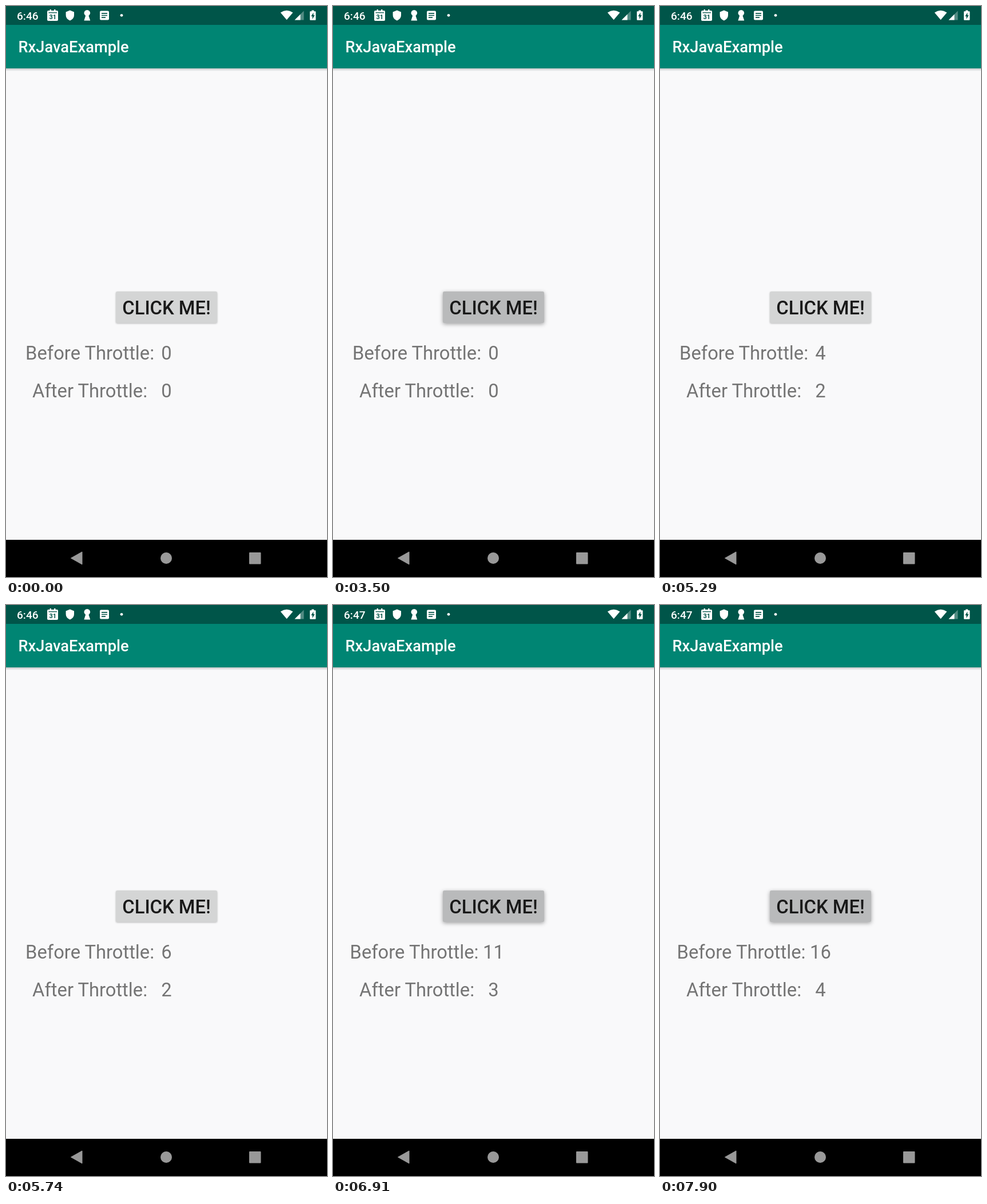
An HTML page that plays this animation: 561 px wide and 998 px high, repeating every 7990 ms.

```html
<!DOCTYPE html>
<html lang="en">
<head>
<meta charset="utf-8">
<title>RxJavaExample</title>
<style>
  html, body { margin: 0; width: 100%; height: 100%; overflow: hidden; background: #f9f9fa; }
  svg { display: block; width: 100vw; height: 100vh; font-family: Roboto, sans-serif; }
  .medium { font-weight: 500; }
  .label { font-size: 32.73px; fill: #747474; text-anchor: middle; }
  #btn { fill: #d4d5d5; filter: drop-shadow(0 1.5px 1.5px rgba(0, 0, 0, .26)); }
  #btn.down { fill: #b9babb; filter: drop-shadow(0 2.5px 3.5px rgba(0, 0, 0, .36)); }
</style>
</head>
<body>
<svg viewBox="0 0 561 998" preserveAspectRatio="none">
  <defs>
    <linearGradient id="shade" x2="0" y2="1">
      <stop stop-color="#000" stop-opacity=".2"/>
      <stop offset="1" stop-color="#000" stop-opacity="0"/>
    </linearGradient>
  </defs>

  <rect width="561" height="998" fill="#f9f9fa"/>
  <rect y="109" width="561" height="5" fill="url(#shade)"/>
  <rect width="561" height="109" fill="#008573"/>
  <rect width="561" height="33" fill="#005549"/>

  <g fill="#fff">
    <text id="clock" class="medium" x="19" y="23.8" font-size="19.1">6:46</text>

    <!-- notification icons -->
    <path d="M74 8h2.500v-2h2.500v2h5v-2h2.500v2h2.500q2 0 2 2v14q0 2-2 2h-15q-2 0-2-2v-14q0-2 2-2z"/>
    <path d="M74.500 11.700h14.500" stroke="#005549" stroke-width="1.300"/>
    <text x="81.700" y="22.700" font-size="11" font-weight="700" text-anchor="middle" fill="#005549">31</text>
    <path d="M111.800 7.500l7.200 2.900v5.600q0 6.300-7.200 9.500q-7.200-3.200-7.200-9.500v-5.600z"/>
    <circle cx="141.800" cy="12.300" r="5.300"/>
    <path d="M139.700 15h4.200l3.300 10.500h-10.800z"/>
    <rect x="164" y="8.500" width="16" height="16" rx="2"/>
    <path d="M167 12.800h10M167 16.500h10M167 20.200h7" stroke="#005549" stroke-width="1.700"/>
    <circle cx="202" cy="16.300" r="2.400"/>

    <!-- system icons -->
    <path d="M490.600 24.200L479.800 11.500q10.800-7.300 21.600 0z"/>
    <path d="M504.500 24.500L520.500 8.500v16z" opacity=".32"/>
    <path d="M504.500 24.500L514.500 14.500v10z"/>
    <path d="M532 9.300h2.200v-1.900h4v1.900h2.200q1 0 1 1v13.500q0 1-1 1h-8.400q-1 0-1-1v-13.500q0-1 1-1z"/>
    <path d="M537.300 11.500v4.400h2.200l-4 7v-5h-2.200z" fill="#005549"/>

    <text class="medium" x="21.500" y="81.400" font-size="27.280">RxJavaExample</text>
  </g>

  <rect id="btn" x="192" y="499" width="177" height="55" rx="2.700"/>
  <text class="medium" x="280.500" y="539.200" font-size="32.730" text-anchor="middle" fill="#191919">CLICK ME!</text>

  <text id="beforeLabel" class="label" x="146.600" y="618.400">Before Throttle:</text>
  <text id="before" class="label" x="280.500" y="618.400">0</text>
  <text class="label" x="146.600" y="684.400">After Throttle:</text>
  <text id="after" class="label" x="280.500" y="684.400">0</text>

  <rect y="933" width="561" height="65"/>
  <g fill="#999">
    <path d="M113.500 965L133 954v22z" stroke="#999" stroke-linejoin="round"/>
    <circle cx="280" cy="965" r="10"/>
    <rect x="425" y="955" width="20.500" height="20.500" rx="1"/>
  </g>
</svg>
<script>
  const LOOP = 7990;
  // Button toggles: press, release, press, release...
  const toggles = [
    3500, 4350, 4440, 4750, 4880, 5020, 5150, 5290, 5380, 5510, 5600,
    5740, 5830, 5960, 6050, 6140, 6280, 6370, 6460,
    6600, 6690, 6780, 6870, 6960, 7050, 7140,
    7320, 7410, 7500, 7590, 7720, 7810, 7900
  ];
  const passed = [4350, 5020, 6140, 7140];
  const minuteTurn = 6870;

  const $ = id => document.getElementById(id);
  const countUntil = (times, t) => times.filter(x => x <= t).length;
  const setText = (id, value) => {
    const el = $(id);
    if (el.textContent !== String(value)) el.textContent = value;
  };

  function draw(t) {
    const n = countUntil(toggles, t);
    const clicks = n >> 1;
    $("btn").classList.toggle("down", n % 2 === 1);
    setText("before", clicks);
    setText("after", countUntil(passed, t));
    setText("clock", t < minuteTurn ? "6:46" : "6:47");
    // The label is centred in the room left of the number.
    $("beforeLabel").setAttribute("x", clicks > 9 ? 142 : 146.6);
  }

  const start = performance.now();
  function tick() {
    draw((performance.now() - start) % LOOP);
    requestAnimationFrame(tick);
  }
  draw(0);
  requestAnimationFrame(tick);
</script>
</body>
</html>
```
